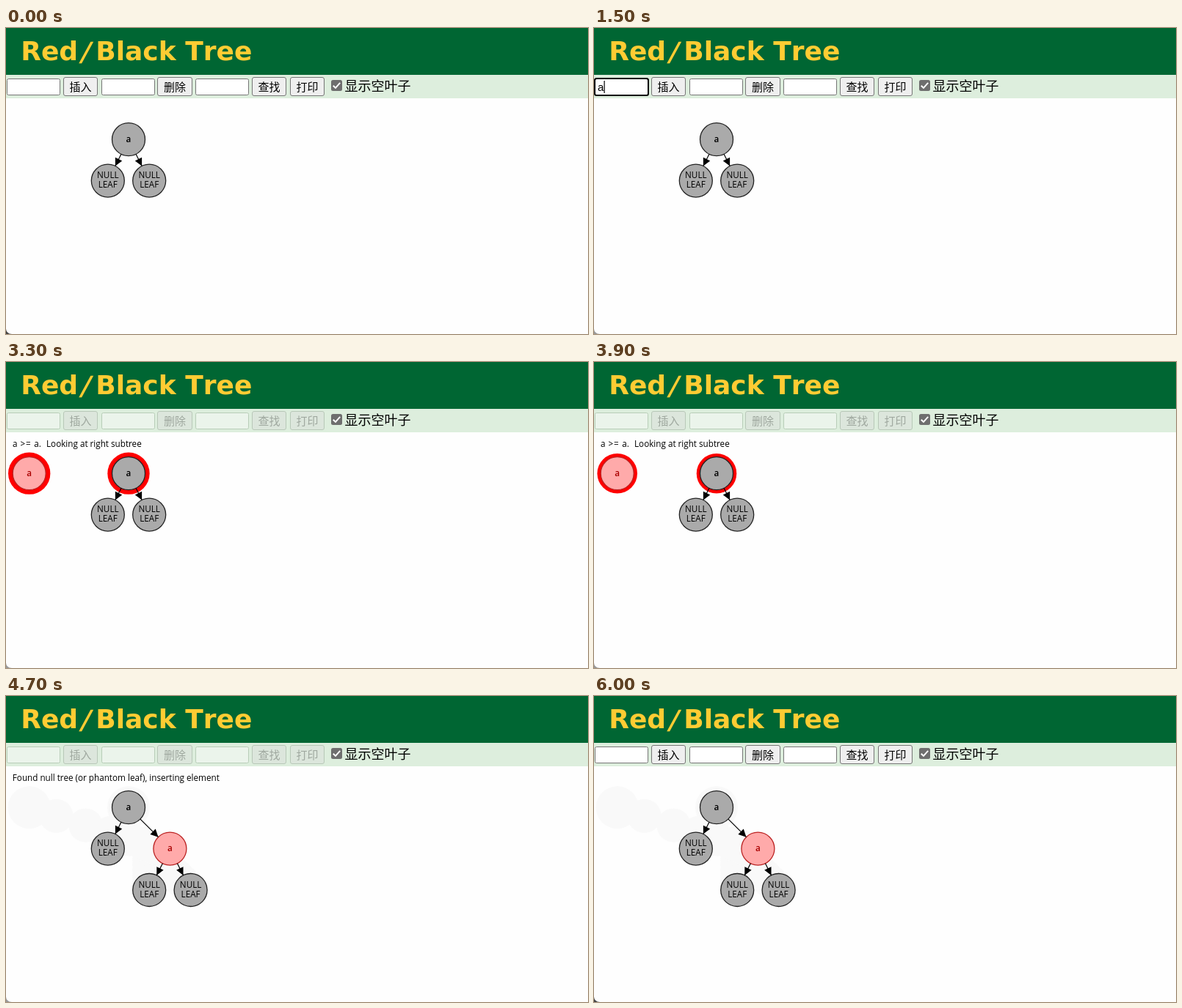
An HTML page that plays this animation: 793x418 px, repeating every 6100 ms.

```html
<!DOCTYPE html>
<html lang="zh-CN">
<head>
<meta charset="utf-8">
<title>Red/Black Tree</title>
<style>
  html, body { margin: 0; width: 100%; height: 100%; overflow: hidden; background: #fefefe; }
  svg { display: block; }
  text { white-space: pre; }
  .title { font: bold 36px "DejaVu Sans", sans-serif; font-kerning: none; fill: #fc3; }
  .cjk { font-family: "Noto Sans CJK SC", "Noto Sans CJK", sans-serif; }
  .small, .key { font: 11.7px "Open Sans", "Noto Sans", sans-serif; }
  .key { font-weight: 600; }
  .field { font: 15px "Liberation Sans", sans-serif; }
</style>
</head>
<body>
<svg id="stage" width="793" height="418" viewBox="0 0 793 418"></svg>
<script>
const LOOP = 6100, STEP = 100;
const RADIUS = 22.5, GAP_X = 28.2, GAP_Y = 56.4;
const BLACK = { line: '#222', fill: '#aaa', ink: '#000' };
const RED = { line: '#b22', fill: '#faa', ink: '#a00' };
const ROOT = { x: 167, y: 152.2 };
const START = { x: 31.7, y: ROOT.y };
const CHILD_Y = ROOT.y + GAP_Y;
const OLD_SLOT = { x: ROOT.x + GAP_X, y: CHILD_Y };
const MOVE_START = 3920, MOVE_TIME = 730;

const stage = document.getElementById('stage');
const at = (x, y) => ({ x, y });
const within = (t, from, to) => t >= from && t < to;

const rect = (x, y, w, h, fill, stroke = 'none', r = 0, width = 1) =>
  `<rect x="${x}" y="${y}" width="${w}" height="${h}" rx="${r}" fill="${fill}" stroke="${stroke}" stroke-width="${width}"/>`;
const disc = (p, r, fill, stroke = 'none') =>
  `<circle cx="${p.x}" cy="${p.y}" r="${r}" fill="${fill}" stroke="${stroke}" stroke-width="1.3"/>`;
const text = (x, y, content, style, fill = '#000', anchor = 'start', size = '') =>
  `<text x="${x}" y="${y}" class="${style}" fill="${fill}" text-anchor="${anchor}"${size && ` font-size="${size}"`}>${content}</text>`;

function header() {
  const slash = text(0, 0, '/', 'title', '', 'middle');
  return rect(0, 0, 793, 64, '#063') + rect(0, 64, 793, 32, '#ded') +
    text(20.2, 44, 'Red', 'title') +
    `<g transform="translate(106.500 45) skewX(-13)">${slash}</g>` +
    text(122.3, 44, 'Black Tree', 'title');
}

function input(x, state) {
  if (state === 'focus') return rect(1, 69, 73, 23, '#fff', '#000', 2.5, 2);
  const [fill, line] = {
    normal: ['#fff', '#767676'], hover: ['#fff', '#4f4f4f'], disabled: ['#ebf4eb', '#b8cdb8']
  }[state];
  return rect(x + .5, 69.5, 72, 22, fill, line, 2);
}

function button(x, width, label, state) {
  const [fill, line, ink] = {
    normal: ['#efefef', '#767676', '#000'], hover: ['#e5e5e5', '#4f4f4f', '#000'],
    active: ['#f5f5f5', '#8d8d8d', '#000'], disabled: ['#dce6dc', '#b8c8b8', '#9fa89f']
  }[state];
  return rect(x + .5, 67.5, width - 1, 25, fill, line, 2.5) +
    text(x + width / 2, 85.5, label, 'cjk', ink, 'middle', 15);
}

function toolbar(t) {
  const base = within(t, 2400, 5600) ? 'disabled' : 'normal';
  const focused = within(t, 1100, 2200);
  const first = focused ? 'focus' : within(t, 600, 1100) ? 'hover' : base;
  const third = within(t, 100, 200) ? 'hover' : base;
  const insert = within(t, 2200, 2400) ? 'active'
    : within(t, 500, 600) || within(t, 1800, 2200) ? 'hover' : base;
  const typed = within(t, 1500, 2400);
  const caret = focused && t < 2000;
  return input(1, first) + button(78, 47, '插入', insert) +
    input(130, base) + button(206, 48, '删除', base) +
    input(258, third) + button(335, 47, '查找', base) + button(387, 47, '打印', base) +
    (typed ? text(5, 86, 'a', 'field') : '') +
    (caret ? rect(typed ? 13.5 : 5, 72, 1.2, 17, '#000') : '') +
    rect(443, 71, 15, 15, '#6e6e6e', 'none', 2.5) +
    '<path d="M445.8 78.7l3.2 3.2 6.2-7" fill="none" stroke="#fff" stroke-width="2"/>' +
    text(461.5, 86, '显示空叶子', 'cjk', '#000', 'start', 18);
}

function message(t) {
  const parts = within(t, 2400, 3200) ? [[12, 'Inserting a']]
    : within(t, 3200, 4000) ? [[9, 'a'], [19.5, '&gt;'], [27, '='], [38.3, 'a.'], [55, 'Looking at right subtree']]
    : within(t, 4000, 5500) ? [[8.8, 'Found null tree (or phantom leaf), inserting element']]
    : [];
  return parts.map(([x, words]) => text(x, 116, words, 'small')).join('');
}

const node = (p, look) => disc(p, RADIUS, look.fill, look.line) +
  text(p.x, p.y + 3.6, 'a', 'key', look.ink, 'middle');
const leaf = p => disc(p, RADIUS, BLACK.fill, BLACK.line) +
  text(p.x, p.y - 3.4, 'NULL', 'small', '#000', 'middle') +
  text(p.x, p.y + 9.8, 'LEAF', 'small', '#000', 'middle');

// The head follows the visible segment, so it flips when two circles overlap.
function edge(a, b) {
  const gap = Math.hypot(b.x - a.x, b.y - a.y);
  const ux = (b.x - a.x) / gap, uy = (b.y - a.y) / gap;
  const tail = at(a.x + ux * RADIUS, a.y + uy * RADIUS);
  const tip = at(b.x - ux * RADIUS, b.y - uy * RADIUS);
  const flip = gap < 2 * RADIUS ? -1 : 1;
  const base = at(tip.x - ux * 10.5 * flip, tip.y - uy * 10.5 * flip);
  const wx = -uy * 5.2, wy = ux * 5.2;
  return `<path d="M${tail.x} ${tail.y}L${tip.x} ${tip.y}" stroke="#000" stroke-width="1.2"/>` +
    `<path d="M${tip.x} ${tip.y}L${base.x + wx} ${base.y + wy}L${base.x - wx} ${base.y - wy}Z"/>`;
}

// Two overlapping moves pull the new node: one to the old slot, one to the final slot.
function insertion(t) {
  const f = Math.min(1, Math.max(0, (t - MOVE_START) / MOVE_TIME));
  const left = (1 - f) ** 2;
  const goal = ROOT.x + 2 * GAP_X, pull = ROOT.x + 1.5 * GAP_X;
  const added = at(f === 1 ? goal : pull + (START.x - pull) * left, CHILD_Y - GAP_Y * left);
  const inner = at(OLD_SLOT.x, CHILD_Y + GAP_Y * f);
  const outer = at(OLD_SLOT.x + 2 * GAP_X * f, inner.y);
  return [added, inner, outer];
}

function trail(t) {
  const mark = (p, r = RADIUS + .6) => disc(p, r, '#f9f9f9');
  let marks = mark(START, 29) + mark(ROOT, 29) + mark(OLD_SLOT);
  for (let s = 4000; s < Math.min(t, 4700); s += STEP) {
    marks += insertion(s).map(p => mark(p)).join('');
  }
  return marks;
}

function tree(t) {
  const leftLeaf = at(ROOT.x - GAP_X, CHILD_Y);
  let back = '', nodes = node(ROOT, BLACK) + leaf(leftLeaf), edges = edge(ROOT, leftLeaf);
  if (t >= 4000) {
    const [added, inner, outer] = insertion(t);
    back = trail(t);
    nodes += node(added, RED) + leaf(inner) + leaf(outer);
    edges += edge(ROOT, added) + edge(added, inner) + edge(added, outer);
  } else {
    nodes += leaf(OLD_SLOT);
    edges += edge(ROOT, OLD_SLOT);
    if (t >= 2400) nodes += node(START, RED);
    if (t >= 3200) {
      const pulse = Math.abs(1 - ((t - 2500) / 410) % 2);
      const ring = RADIUS + 3.7 + 2.6 * pulse;
      back = disc(START, ring, '#f00') + disc(ROOT, ring, '#f00');
    }
  }
  return back + nodes + edges;
}

function corner(t) {
  const color = within(t, 1100, 6000) ? '#999' : '#444';
  return `<path d="M0 411Q0.500 417.500 8 418H0Z" fill="${color}"/>`;
}

let shown = -1;
function draw(now) {
  const t = Math.floor((now % LOOP) / STEP) * STEP;
  if (t !== shown) {
    shown = t;
    stage.innerHTML = rect(0, 0, 793, 418, '#fefefe') + header() + toolbar(t) +
      tree(t) + message(t) + corner(t);
  }
}

const began = performance.now();
function tick() {
  draw(performance.now() - began);
  requestAnimationFrame(tick);
}
tick();
</script>
</body>
</html>
```
